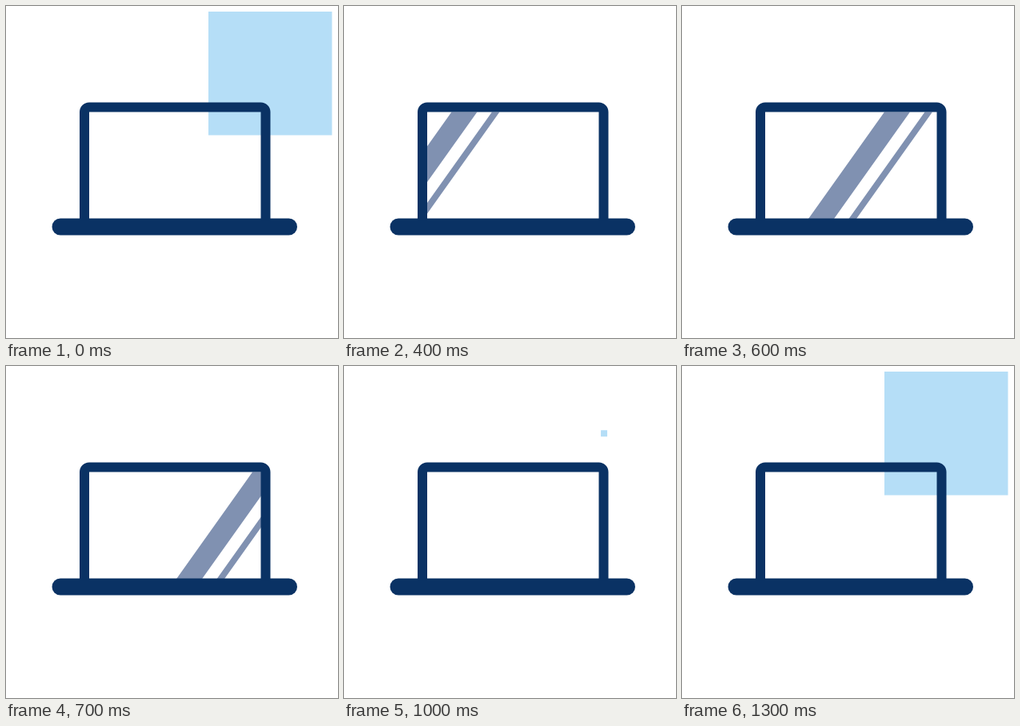
An HTML page for the animation above (1.55 s loop, 415 by 415 pixels).

```html
<!DOCTYPE html>
<html lang="en">
<head>
<meta charset="utf-8">
<title>Laptop</title>
<style>
html, body { margin: 0; height: 100%; overflow: hidden; background: #fff; }
svg { display: block; width: 100%; height: 100%; }
</style>
</head>
<body>
<svg viewBox="0 0 415 415">
  <clipPath id="screen"><path d="M103 132H319V266H103Z"/></clipPath>
  <rect id="square" fill="#b5def7"/>
  <g clip-path="url(#screen)">
    <!-- x = 0 is the right edge of the thin stripe at the top of the screen -->
    <path id="shine" fill="#8091b1" d="M-60 132.5h32l-95 133.5h-32ZM-9.500 132.5H0L-95 266h-9.500Z"/>
  </g>
  <g fill="#0a3264">
    <path fill-rule="evenodd" d="M92 270V132.500a12 12 0 0 1 12-12H318.500a12 12 0 0 1 12 12V270ZM104 270H318.500V132.500H104Z"/>
    <rect x="57.500" y="265.500" width="306.500" height="21" rx="10.500"/>
  </g>
</svg>
<script>
const LOOP = 1550, STEP = 50, SHINE = 300, GROW = 1000, GROWN = 1300, FULL = 154.5;
const square = document.getElementById('square');
const shine = document.getElementById('shine');

function squareSize(t) {
  if (t < SHINE || t >= GROWN) return FULL;
  if (t < GROW) return 0;
  const x = (t - GROW) / (GROWN - GROW);
  return 8 + (FULL - 8) * (1.1 * x + .43 * x * x - .53 * x ** 3);
}

function draw(now) {
  const t = Math.floor(now % LOOP / STEP) * STEP;

  const size = squareSize(t);
  square.setAttribute('x', 324.8 + 5.45 * size / FULL - size / 2);
  square.setAttribute('y', 84.25 - size / 2);
  square.setAttribute('width', size);
  square.setAttribute('height', size);

  // The sweep slows down slightly on its way across.
  const n = (t - SHINE) / STEP;
  const visible = t >= SHINE && t < GROW - STEP;
  shine.setAttribute('visibility', visible ? 'visible' : 'hidden');
  shine.setAttribute('transform', `translate(${131 + 32.4 * n - .345 * n * n})`);
}

const start = performance.now();
function tick() {
  draw(performance.now() - start);
  requestAnimationFrame(tick);
}
tick();
</script>
</body>
</html>
```
